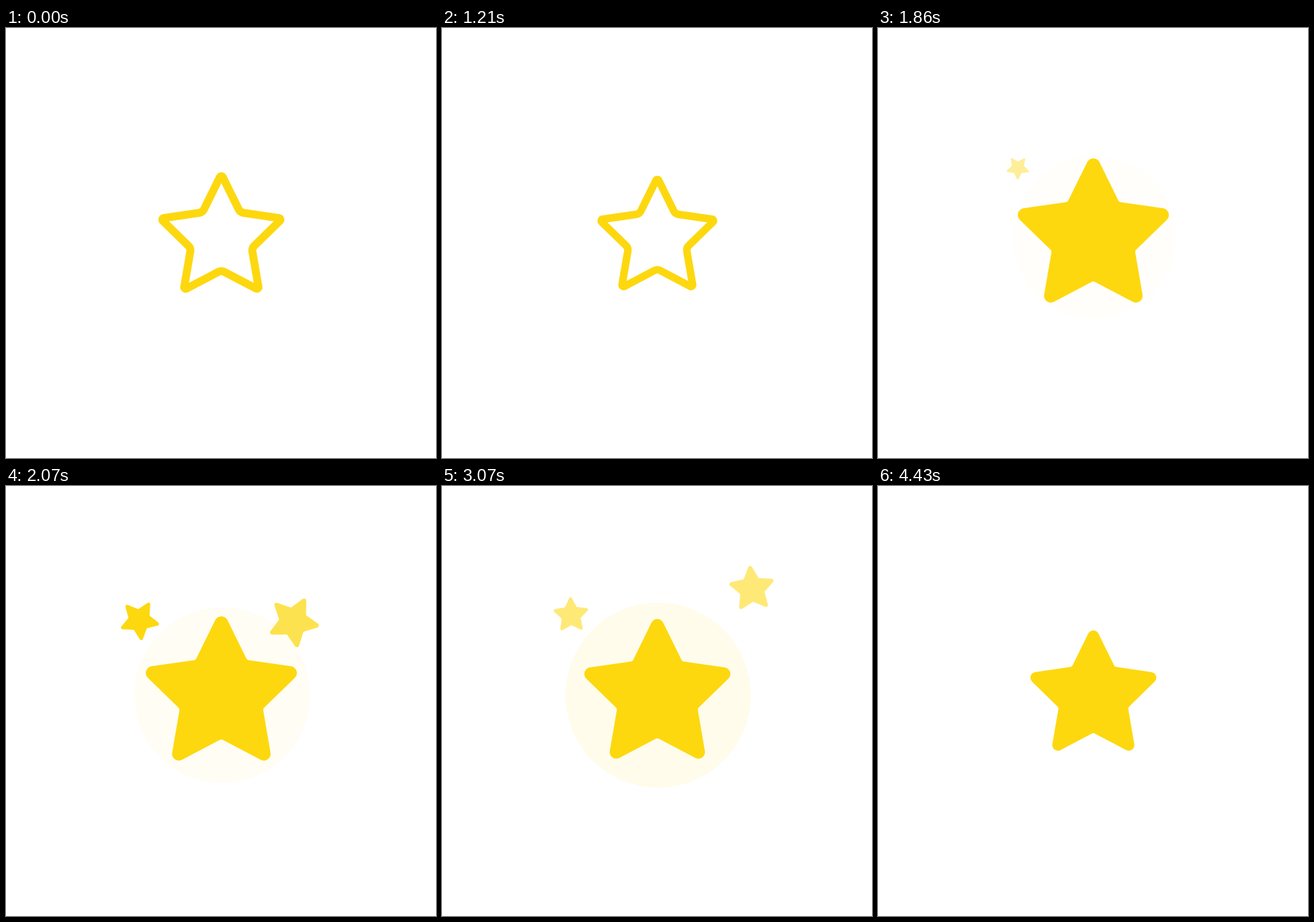
These frames come from a looping animation (640x640 px, 4780 ms). An HTML page with a canvas:

```html
<!DOCTYPE html>
<html lang="en">
<head>
<meta charset="utf-8">
<title>Star</title>
<style>
html, body { margin: 0; width: 100%; height: 100%; overflow: hidden; background: #fff; }
canvas { display: block; width: 640px; height: 640px; }
</style>
</head>
<body>
<canvas id="stage" width="640" height="640"></canvas>
<script>
const ctx = document.getElementById('stage').getContext('2d');
const LOOP = 4780;
const FPS = 14;
const BURST = 2070;
const YELLOW = [253, 216, 15];

// Each spark is thrown out, then drifts; "drift" is px per second, "lag" the throw left at BURST
const sparks = [
  { start: 1750, x: 197.3, y: 198.7, drift: [-5.2, -6.4], lag: [1.2, 1], size: .304, turn: 30, spin: -32 },
  { start: 1880, x: 454.4, y: 167.3, drift: [7, -14], lag: [-26.8, 34.7], size: .392, turn: 27, spin: 40 }
];

const ramp = (t, from, to) => Math.min(1, Math.max(0, (t - from) / (to - from)));
const easeIn = u => u * u;
const mix = a => `rgb(${YELLOW.map(c => Math.round(255 + (c - 255) * a))})`;

function starPath(outer, inner, tipRadius, notchRadius) {
  const path = new Path2D();
  const point = i => {
    const a = i * Math.PI / 5, r = i % 2 ? inner : outer;
    return [r * Math.sin(a), -r * Math.cos(a)];
  };
  const [ax, ay] = point(0), [bx, by] = point(1);
  path.moveTo((ax + bx) / 2, (ay + by) / 2);
  for (let i = 1; i <= 10; i++) {
    path.arcTo(...point(i), ...point(i + 1), i % 2 ? notchRadius : tipRadius);
  }
  path.closePath();
  return path;
}

const outline = starPath(95.4, 47.7, 2.5, 9.5);
const solid = starPath(108.7, 54.3, 8.4, 3.7);

function drawHalo(t) {
  const glow = .094 * Math.sin(Math.PI * ramp(t, 1750, 3700));
  if (glow < .004) return;
  ctx.fillStyle = mix(glow);
  ctx.beginPath();
  ctx.arc(321.8, 311.3, 138 - 7.3 * Math.exp((BURST - t) / 250), 0, 2 * Math.PI);
  ctx.fill();
}

function drawSpark(s, t) {
  const sec = (t - BURST) / 1000;
  const size = s.size * ramp(t, s.start, s.start + 190) * (1 - ramp(t, 2000, 4280) ** 3);
  const alpha = Math.min(ramp(t, s.start, s.start + 260), 1 - .436 * sec);
  if (size <= 0 || alpha <= 0) return;
  const lag = Math.exp(-sec / .1);
  ctx.save();
  ctx.globalAlpha = alpha;
  ctx.translate(s.x + s.drift[0] * sec + s.lag[0] * lag, s.y + s.drift[1] * sec + s.lag[1] * lag);
  ctx.rotate((s.turn + s.spin * sec) * Math.PI / 180);
  ctx.scale(size, size);
  ctx.fill(solid);
  ctx.restore();
}

function drawMain(t) {
  const fill = ramp(t, 1430, 1860);
  const scale = 1 - .1 * easeIn(ramp(t, 830, 1370)) + .3 * easeIn(ramp(t, 1370, 1790)) -
    .2 * easeIn(ramp(t, 2050, 4330));
  ctx.save();
  ctx.translate(320.5, 320);
  ctx.scale(scale, scale);
  ctx.translate(0, -7);
  ctx.globalAlpha = fill;
  ctx.fill(fill < 1 ? outline : solid);
  if (fill < 1) {
    ctx.globalAlpha = 1;
    ctx.stroke(outline);
  }
  ctx.restore();
}

// Hold each step of the 14 fps clock, rounded to 10 ms
function stepTime(t) {
  const start = n => Math.round(n * 100 / FPS) * 10;
  const n = Math.floor((t + 5) * FPS / 1000);
  return start(start(n) > t ? n - 1 : n);
}

function draw(now) {
  const t = stepTime(now % LOOP);
  ctx.fillStyle = '#fff';
  ctx.fillRect(0, 0, 640, 640);
  drawHalo(t);
  ctx.fillStyle = ctx.strokeStyle = mix(1);
  ctx.lineWidth = 11.8;
  ctx.lineJoin = 'round';
  sparks.forEach(s => drawSpark(s, t));
  drawMain(t);
}

const begin = performance.now();
function loop() {
  draw(performance.now() - begin);
  requestAnimationFrame(loop);
}
loop();
</script>
</body>
</html>
```
